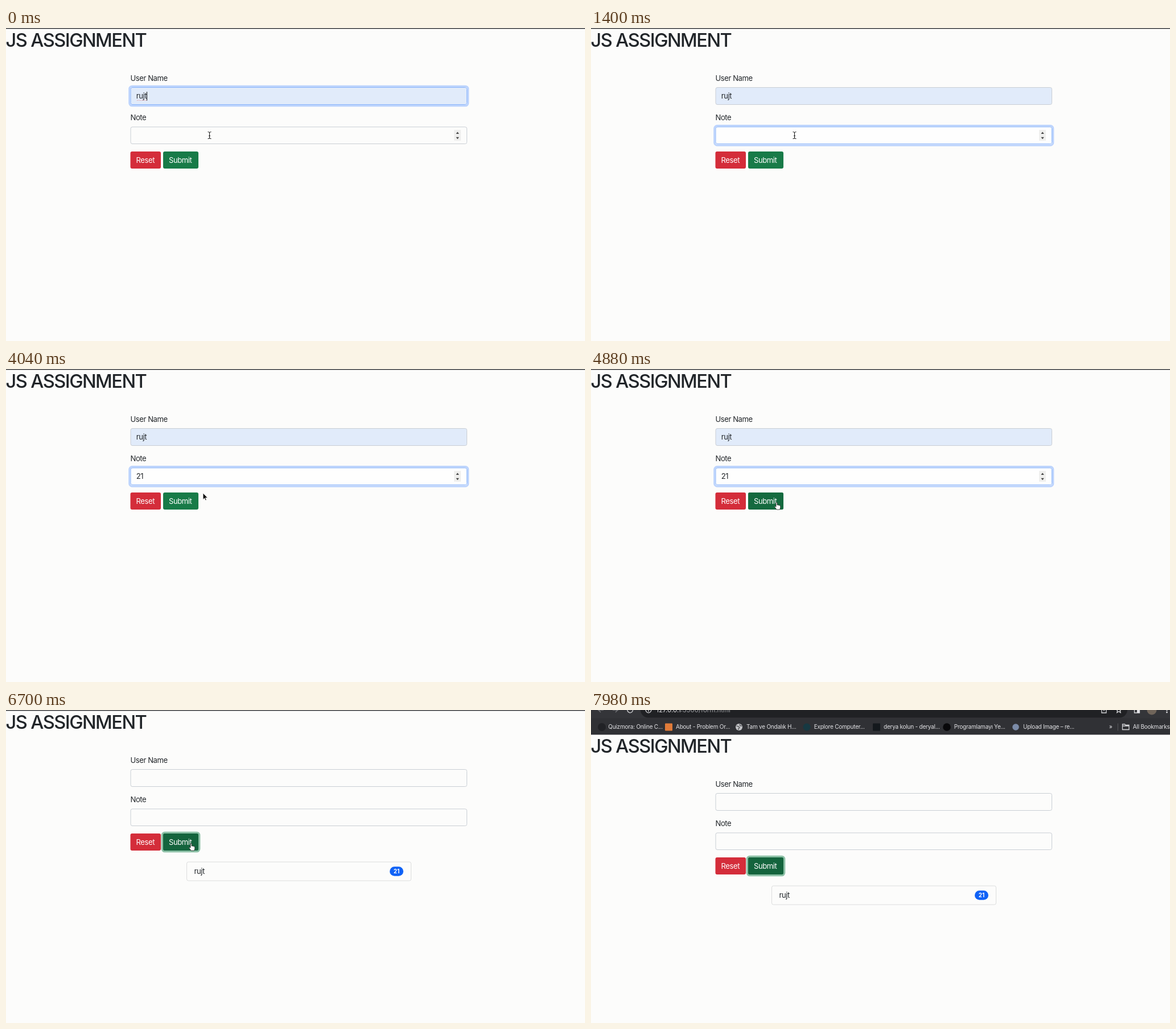
An HTML page for the animation above (8000 ms loop, 1017 by 550 pixels).

```html
<!DOCTYPE html>
<html lang="en">
<head>
<meta charset="utf-8">
<title>JS Assignment</title>
<style>
  html, body { margin: 0; height: 100%; overflow: hidden; background: #fcfcfb; }
  svg { display: block; width: 100vw; height: 100vh; }
  text { font: 13.06px Inter, "Liberation Sans", sans-serif; letter-spacing: -.033em; fill: #212529; white-space: pre; }
  h1, .title { font-size: 32.6px; font-weight: 500; letter-spacing: -.047em; }
  .white { fill: #fff; }
  .badge { font-size: 9.8px; font-weight: 700; letter-spacing: 0; text-anchor: middle; }
  .field { fill: #fcfcfb; stroke: #c9ced4; }
  .ring { fill: none; stroke: #bdd4fd; }
  #bar text { font-size: 10px; letter-spacing: -.022em; fill: #e3e3e6; }
  #bar .url { font-size: 11.4px; letter-spacing: 0; }
  .line { fill: none; stroke: #d4d5d8; stroke-width: 1.3; }
  .dim { stroke: #77787c; }
  .cursor { fill: #111; stroke: #fff; stroke-width: .8; stroke-linejoin: round; }
</style>
</head>
<body>
<svg viewBox="0 0 1017 550">
  <g id="page">
    <text class="title" x="-.5" y="33.3">JS ASSIGNMENT</text>
    <text x="218.5" y="93.2">User Name</text>
    <text x="218.5" y="162.2">Note</text>

    <rect id="nameRing" class="ring"/>
    <rect id="nameBox" class="field" x="219" y="104.5" width="590.5" height="30" rx="3"/>
    <text id="name" x="228.8" y="124.4">rujt</text>
    <path id="squiggle" d="M230 127h17" stroke="#e58a8a" stroke-width="1.2" stroke-dasharray="1.5 1.5"/>
    <path id="nameCaret" d="M247.5 112v15.5" stroke="#111"/>

    <rect id="noteRing" class="ring"/>
    <rect id="noteBox" class="field" x="219" y="173.9" width="590.5" height="29.6" rx="3"/>
    <text id="note" x="228.8" y="193.4"></text>
    <path id="noteCaret" d="M0 181v15.5" stroke="#111"/>
    <g id="spinner">
      <rect x="787" y="179" width="12" height="19" fill="#efefee"/>
      <path d="M790.4 186l2.7-3.4 2.7 3.4zM790.4 191.8l2.7 3.4 2.7-3.4z" fill="#444"/>
    </g>

    <rect x="218.5" y="217" width="53.5" height="30" rx="3" fill="#d42d3a"/>
    <text class="white" x="228.6" y="237">Reset</text>
    <rect id="submitRing" class="ring" style="stroke:#8dc1a7"/>
    <rect x="276" y="217" width="62" height="30" rx="3" fill="#187b48"/>
    <rect id="submitDark" x="276" y="217" width="62" height="30" rx="3" fill="#14643d"/>
    <text class="white" x="286" y="237">Submit</text>

    <g id="list">
      <rect x="317.5" y="267" width="394" height="33" rx="3" fill="#fcfcfb" stroke="#dcdddd"/>
      <text x="330.6" y="288.3">rujt</text>
      <rect x="674" y="275.2" width="24" height="16.6" rx="8.3" fill="#1062f6"/>
      <text class="badge white" x="686" y="287.1">21</text>
    </g>
  </g>

  <g id="bar">
    <path d="M0-60H1017V43.3H0z" fill="#343539"/>
    <path d="M0 14.5H1017V43.3H0z" fill="#303135"/>
    <rect x="87" y="-14" width="855" height="27.5" rx="13.7" fill="#202124"/>
    <path class="line dim" d="M22 0h-9l4-4m-4 4l4 4M38 0h9l-4-4m4 4l-4 4"/>
    <path class="line" d="M73.5 0a4.8 4.8 0 1 1-1.5-3.5"/>
    <circle class="line" cx="101" cy="0" r="4.8"/>
    <path class="line" d="M101-.8V3M898-2h-1v7h8v-7h-1M901 2v-7M927-5l1.4 3.3 3.6.3-2.7 2.3.8 3.6-3.1-2-3.1 2 .8-3.6-2.7-2.3 3.6-.3zM954.5-5h9v10h-9z"/>
    <path d="M959-5h4.5v10H959z" fill="#e3e3e6"/>
    <circle cx="985" cy="0" r="8.5" fill="#70655a"/>
    <circle cx="1011.5" cy="4" r="1.4" fill="#d4d5d8"/>
    <circle cx="1011.5" cy="0" r="1.4" fill="#d4d5d8"/>
    <text class="url" x="114.5" y="4">127.0.0.1<tspan fill="#9b9ca0">:5500/form.html</tspan></text>

    <circle cx="19" cy="30" r="7" fill="#212226"/>
    <text x="30.3" y="33.3">Quizmora: Online C...</text>
    <rect x="130" y="23.5" width="13" height="13" rx="1" fill="#e07b39"/>
    <text x="149" y="33.3">About - Problem Or...</text>
    <circle cx="260" cy="30" r="6" fill="#c3c4c7"/>
    <path d="M255.5 28l4 1 1.5 2-2 1.5v2.5M261 25l1 2.5 3 .5" fill="none" stroke="#55565a" stroke-width="1.4"/>
    <text x="273" y="33.3">Tam ve Ondalık H...</text>
    <circle cx="379" cy="30" r="6.5" fill="#173942"/>
    <text x="391.7" y="33.3">Explore Computer...</text>
    <rect x="495" y="23.5" width="13" height="13" rx="1" fill="#14191d"/>
    <text x="514" y="33.3">derya kolun - deryal...</text>
    <circle cx="625" cy="30" r="6.8" fill="#08080a"/>
    <text x="637.8" y="33.3">Programlamayı Ye...</text>
    <circle cx="746" cy="30" r="5.8" fill="#7b8ba8"/>
    <text x="759" y="33.3">Upload Image – re...</text>
    <text x="910" y="33.3">»</text>
    <path d="M925.5 23.5v13" stroke="#56575b"/>
    <path class="line" d="M933.5 25h4l1.500 1.500h6v8h-11.500zM933.500 28h11.500"/>
    <text x="951.800" y="33.3">All Bookmarks</text>
  </g>

  <g id="cursor">
    <path id="beam" d="M-3-6Q-.5-6 0-4.800Q.5-6 3-6M0-5V5M-3 6Q-.5 6 0 4.800Q.5 6 3 6M-1.500 1h3" fill="none" stroke="#222" stroke-width="1.100"/>
    <path id="arrow" class="cursor" d="M0 0V11.500L2.700 9 4.400 13 6.200 12.200 4.500 8.400H8.200z"/>
    <path id="hand" class="cursor" d="M-1 1Q0-.6 1 1V5Q2 4.200 2.900 5.300 4 4.600 4.800 5.800 6 5.200 6.700 6.800V9.500Q6.500 11 5.600 13H-.2Q-1.500 10.500-3.500 8.200-3.300 6.600-1.700 7.500L-1 8.200z" style="fill:#fff;stroke:#222"/>
  </g>
</svg>
<script>
const LOOP = 8000;
const NOTE_FOCUS = 295, TYPE_2 = 2900, TYPE_1 = 3120, MOVE = 3560,
      HOVER = 4480, PRESS = 5320, CLICK = 5400, LEAVE = 6800, SLIDE = 7850;
// time, x, y of the pointer hot spot
const PATH = [[0, 357.5, 188.5], [MOVE, 357.5, 188.5], [3950, 346, 218], [4250, 346, 218],
  [4600, 326, 234], [4950, 326, 234], [5200, 325, 234], [LEAVE, 325, 234],
  [7350, 400, 60], [7600, 430, -20], [LOOP, 430, -20]];

const el = id => document.getElementById(id);
const clamp = v => Math.max(0, Math.min(1, v));
const smooth = v => v * v * (3 - 2 * v);
const ramp = (t, start, span = 150) => smooth(clamp((t - start) / span));
const mix = (a, b, p) => a + (b - a) * p;
const show = (id, on) => el(id).setAttribute("visibility", on ? "visible" : "hidden");
const inside = (x, y, l, t, r, b) => x >= l && x <= r && y >= t && y <= b;

function set(id, attrs) {
  for (const k in attrs) el(id).setAttribute(k, attrs[k]);
}

function ring(id, x, y, w, h, p) {
  const s = 3.3 * p;
  set(id, { x: x - s / 2, y: y - s / 2, width: w + s, height: h + s,
    rx: 3 + s / 2, "stroke-width": s, opacity: p });
}

function field(id, top, p, rest) {
  ring(id + "Ring", 218.5, top - .5, 591.5, 31, p);
  const rgb = [201, 206, 212].map((v, i) => mix(v, [139, 182, 250][i], p));
  el(id + "Box").style.stroke = `rgb(${rgb})`;
  el(id + "Box").style.fill = rest;
}

function pointer(t) {
  const i = PATH.findIndex(p => p[0] > t);
  const [a, b] = [PATH[i - 1], PATH[i]];
  const p = smooth((t - a[0]) / (b[0] - a[0]));
  return [mix(a[1], b[1], p), mix(a[2], b[2], p)];
}

function draw(t) {
  const [x, y] = pointer(t);
  const sent = t >= CLICK;
  const noteFocus = t >= NOTE_FOCUS && t < PRESS;
  const overNote = inside(x, y, 219, 174, 809, 204);
  const overField = overNote || inside(x, y, 219, 104, 809, 135);
  const overSubmit = inside(x, y, 276, 217, 338, 247);

  field("name", 104.5, 1 - ramp(t, NOTE_FOCUS), sent ? "#fcfcfb" : "#e1ebfa");
  field("note", 173.9, ramp(t, NOTE_FOCUS) - ramp(t, PRESS), noteFocus ? "#fefefe" : "#fcfcfb");
  show("name", !sent);
  show("squiggle", t < NOTE_FOCUS);
  show("nameCaret", t < NOTE_FOCUS);

  const note = sent || t < TYPE_2 ? "" : t < TYPE_1 ? "2" : "21";
  el("note").textContent = note;
  const blink = t < TYPE_2 ? t < 1100 : t < TYPE_1 || (t - TYPE_1) % 1000 < 500;
  show("noteCaret", noteFocus && blink);
  set("noteCaret", { transform: `translate(${229.5 + note.length * 7})` });
  show("spinner", noteFocus || overNote);

  ring("submitRing", 276, 217, 62, 30, ramp(t, PRESS));
  set("submitDark", { opacity: .75 * ramp(t, HOVER) + .25 * ramp(t, PRESS) });
  show("list", sent);

  const drop = 42 * clamp((t - SLIDE) / 125);
  set("page", { transform: `translate(0 ${drop})` });
  set("bar", { transform: `translate(0 ${drop - 42})` });

  const seen = t < TYPE_2 || t >= MOVE;
  set("cursor", { transform: `translate(${x} ${y})` });
  show("beam", seen && overField);
  show("hand", seen && overSubmit);
  show("arrow", seen && !overField && !overSubmit);
}

function tick() {
  draw(performance.now() % LOOP);
  requestAnimationFrame(tick);
}
tick();
</script>
</body>
</html>
```
